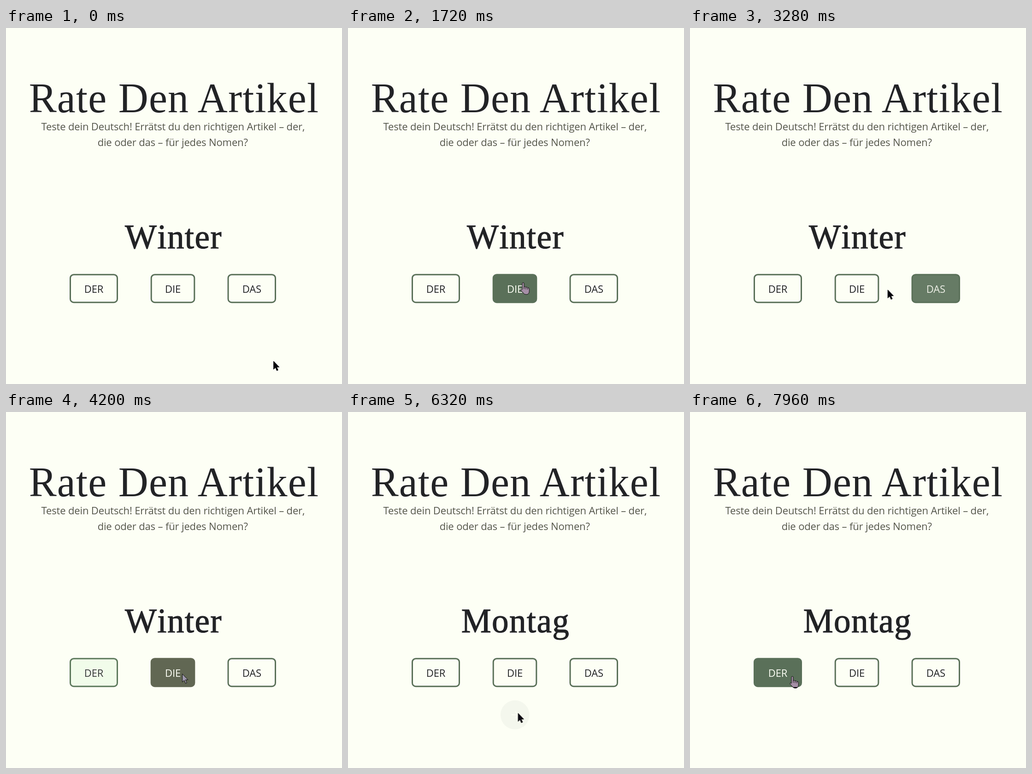
These frames come from a looping animation (729x769 px, 8 s). An HTML page:

```html
<!DOCTYPE html>
<html lang="de">
<head>
<meta charset="utf-8">
<title>Artikel-Quiz</title>
<style>
  :root {
    --paper: #fdfff5;
    --ink: #222326;
    --moss: #5a7059;
    --right: #80dc80;
    --wrong: #a01018;
  }
  html, body { margin: 0; width: 100%; height: 100%; overflow: hidden; background: var(--paper); }
  svg { display: block; width: 100%; height: 100%; }
  text { text-anchor: middle; stroke: none; }

  .serif {
    font-family: "Liberation Serif", Georgia, serif;
    font-kerning: none;
    fill: var(--ink); stroke: var(--ink); stroke-width: 1.1px;
  }
  .title { font-size: 90px; letter-spacing: 1.2px; }
  .word { font-size: 73px; letter-spacing: 1.4px; }
  .sans { font: 22px "Open Sans", "Noto Sans", sans-serif; letter-spacing: -.15px; }
  .intro { fill: #54554b; }

  /* One percent of the loop is 80 ms. */
  .button, .next, .word, .cursor {
    animation-duration: 8s;
    animation-iteration-count: infinite;
    animation-timing-function: ease;
  }
  .button { fill: var(--paper); stroke: var(--moss); stroke-width: 3; color: var(--ink); }
  .button text { fill: currentColor; }
  .der { animation-name: der; }
  .die { animation-name: die; }
  .das { animation-name: das; }

  @keyframes der {
    0%, 8.6%, 19%, 51.9%, 79.5%, 91.2% { fill: var(--paper); color: var(--ink); }
    12.4%, 15%, 95%, 100% { fill: var(--moss); color: var(--paper); }
    58.1%, 73.9% { fill: var(--right); color: var(--paper); }
    0%, 51.9%, 79.5%, 100% { stroke: var(--moss); }
    58.1%, 73.9% { stroke: var(--right); }
  }
  @keyframes die {
    0%, 17.3%, 28.7%, 41.6%, 79.5%, 100% { fill: var(--paper); color: var(--ink); }
    21%, 24.9%, 45.4%, 51.9% { fill: var(--moss); color: var(--paper); }
    58.1%, 73.9% { fill: var(--wrong); color: var(--paper); }
    0%, 51.9%, 79.5%, 100% { stroke: var(--moss); }
    58.1%, 73.9% { stroke: var(--wrong); }
  }
  @keyframes das {
    0%, 27.3%, 45.4%, 100% { fill: var(--paper); color: var(--ink); }
    31%, 40.6% { fill: var(--moss); color: var(--paper); }
  }

  .next { animation-name: next; }
  @keyframes next {
    0%, 63.5%, 81%, 100% { opacity: 0; }
    67%, 73.9% { opacity: 1; }
  }

  .word { animation-timing-function: step-end; }
  .first { animation-name: leave; }
  .second { animation-name: enter; }
  @keyframes leave { 0% { opacity: 1; } 73.5%, 100% { opacity: 0; } }
  @keyframes enter { 0% { opacity: 0; } 73.5%, 100% { opacity: 1; } }

  .cursor { animation-timing-function: linear, step-end; stroke-linejoin: round; }
  .arrow { animation-name: travel, arrow; }
  .hand { animation-name: travel, hand; }
  .invert { fill: #fff; mix-blend-mode: difference; }
  .outline { fill: none; stroke: #000; stroke-width: .9; }

  @keyframes travel {
    0% { transform: translate(580px, 719px); }
    3.5% { transform: translate(580px, 719px); animation-timing-function: ease-in-out; }
    10% { transform: translate(205px, 568px); }
    14% { transform: translate(212px, 562px); }
    18.5% { transform: translate(350px, 556px); }
    21.5% { transform: translate(380px, 550px); }
    24% { transform: translate(384px, 552px); }
    29% { transform: translate(530px, 558px); }
    38% { transform: translate(536px, 566px); }
    40.6% { transform: translate(480px, 566px); }
    41% { transform: translate(429px, 565px); }
    42.5%, 52.5% { transform: translate(382px, 565px); }
    58% { transform: translate(382px, 565px); animation-timing-function: ease-in-out; }
    63% { transform: translate(372px, 641px); }
    66%, 73.4% { transform: translate(368px, 650px); }
    79% { transform: translate(368.5px, 650px); }
    85% { transform: translate(368.5px, 650px); animation-timing-function: ease-in-out; }
    93% { transform: translate(224px, 572px); }
    99.5%, 100% { transform: translate(222px, 571px); }
  }
  @keyframes arrow {
    0%, 15%, 24.9%, 40.6%, 51.9%, 73.4% { opacity: 1; }
    8.6%, 17.3%, 27.3%, 41.6%, 64%, 91.2%, 100% { opacity: 0; }
  }
  @keyframes hand {
    0%, 15%, 24.9%, 40.6%, 51.9%, 73.4% { opacity: 0; }
    8.6%, 17.3%, 27.3%, 41.6%, 64%, 91.2%, 100% { opacity: 1; }
  }
</style>
</head>
<body>
<svg viewBox="0 0 729 769">
  <defs>
    <path id="arrow" d="M.6.8V18.3L4.7 14.6 7.6 21.2 10.3 20 7.4 13.5H12.8Z"/>
    <path id="hand" d="M-2 2Q-2 0 0 0T2 2V9.5Q4.5 7.5 6 10 8.5 8.5 9.8 11.2 13 10.5 13.3 13.5V18Q13.3 25.6 6.5 25.6 2 25.6 0 22L-5 16.5Q-5.5 12.8-2 15.2Z"/>
  </defs>
  <rect width="729" height="769" fill="#fdfff5"/>

  <g class="serif title">
    <text x="134.5" y="182">Rate</text>
    <text x="320.5" y="182">Den</text>
    <text x="547.5" y="182">Artikel</text>
  </g>
  <g class="sans intro">
    <text x="362.4" y="220.5">Teste dein Deutsch! Errätst du den richtigen Artikel – der,</text>
    <text x="361.7" y="254.5">die oder das – für jedes Nomen?</text>
  </g>

  <text class="serif word first" x="363.5" y="476">Winter</text>
  <text class="serif word second" x="363.5" y="476">Montag</text>

  <g class="sans">
    <g class="button der">
      <rect x="139.5" y="532.7" width="102" height="60" rx="7.5"/>
      <text x="190.5" y="572">DER</text>
    </g>
    <g class="button die">
      <rect x="315.2" y="532.7" width="93.6" height="60" rx="7.5"/>
      <text x="362" y="572">DIE</text>
    </g>
    <g class="button das">
      <rect x="482" y="532.7" width="102.5" height="60" rx="7.5"/>
      <text x="533.3" y="572">DAS</text>
    </g>
  </g>

  <g class="next">
    <circle cx="362.2" cy="654.2" r="31.4" fill="#5a7059"/>
    <path d="M354.5 654.2H370M363 647L370 654.2 363 661.4" fill="none" stroke="#fdfff5" stroke-width="1.8"/>
  </g>

  <use class="cursor arrow invert" href="#arrow"/>
  <use class="cursor arrow outline" href="#arrow"/>
  <use class="cursor hand invert" href="#hand"/>
  <g class="cursor hand outline">
    <use href="#hand"/>
    <path d="M2 9.5V14M6 10V14.5M9.8 11.2V15"/>
  </g>
</svg>
</body>
</html>
```
